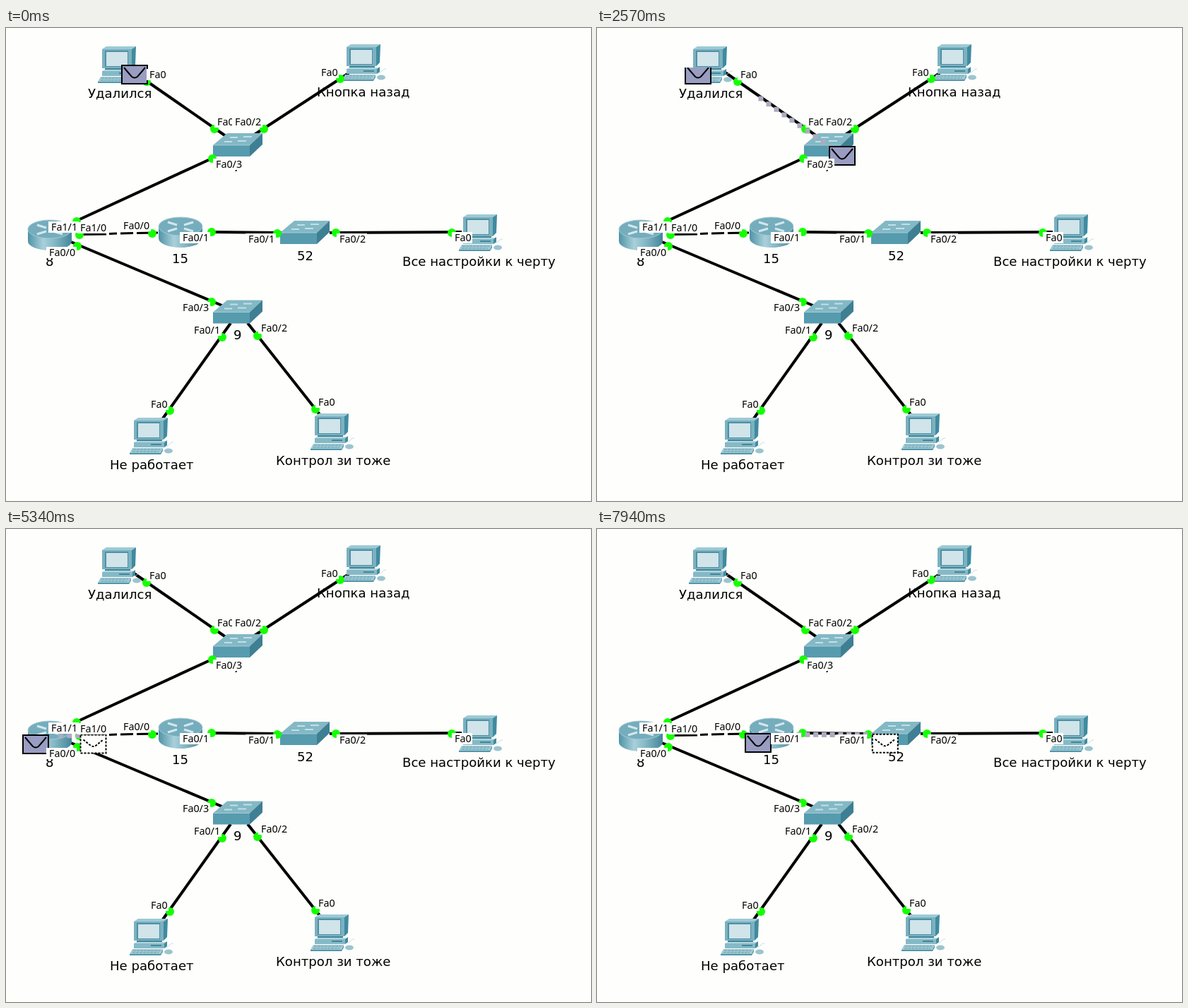
These frames come from a looping animation (828 px wide and 670 px high, 8 s). An HTML page:

```html
<!DOCTYPE html>
<html lang="ru">
<head>
<meta charset="utf-8">
<title>Network packet</title>
<style>
  html, body { margin: 0; width: 100%; height: 100%; overflow: hidden; background: #fefefc; }
  svg { display: block; }
  .link { stroke: #000; stroke-width: 4; }
  .cross { stroke: #000; stroke-width: 3; }
  .port { font: 14.3px "Noto Sans", "Open Sans", sans-serif; }
  .name { font: 18.1px "DejaVu Sans", sans-serif; }
</style>
</head>
<body>
<svg id="stage" width="828" height="670" viewBox="0 0 828 670">
  <defs>
    <linearGradient id="drum">
      <stop offset="0" stop-color="#4f93a6"/>
      <stop offset=".35" stop-color="#a9d0da"/>
      <stop offset=".6" stop-color="#85b8c6"/>
      <stop offset="1" stop-color="#43869a"/>
    </linearGradient>
    <g id="pc">
      <path d="M50 39q3 3 6-1t6-3" fill="none" stroke="#c9dde3"/>
      <path d="M10 30h36v6h-36z" fill="#43869a"/>
      <path d="M6 35l4-2h42l-3 2z" fill="#b3d6de"/>
      <path d="M6 35h43v7h-43z" fill="#86b9c6"/>
      <path d="M49 35l4-3v7l-4 3z" fill="#3f8ba0"/>
      <path d="M30 38h15" stroke="#43869a" stroke-width="2"/>
      <path d="M6 4l6-4h42l-6 4z" fill="#9dcad5"/>
      <path d="M48 4l6-4-1 26-5 5z" fill="#3f8ba0"/>
      <path d="M6 4h42v27h-42z" fill="#7bb1c0"/>
      <path d="M10 6h33v23h-33z" fill="#4f90a3"/>
      <path d="M12 8h30v20h-30z" fill="#d0e4ea"/>
      <path d="M4 43h43l-3 7h-44z" fill="#a0c9d3"/>
      <path d="M5 45h38M4 48h37" stroke="#659fb0" stroke-dasharray="4 1"/>
      <path d="M0 50h44l3-7v4l-3 5h-44z" fill="#5296a9"/>
      <ellipse cx="55" cy="47" rx="6" ry="3.5" fill="#9cc4cf"/>
    </g>
    <g id="switch">
      <path d="M0 17L20 0H70L52 17z" fill="#83b8c5"/>
      <path d="M0 17h52v16h-52z" fill="#569bae"/>
      <path d="M52 17L70 0V16L52 33z" fill="#3f7f93"/>
      <path d="M24 6h11M43 5h12M16 12h11M35 11h12" stroke="#c4dfe6" stroke-width="2"/>
      <path d="M0 17h52" stroke="#a3cbd6"/>
    </g>
    <g id="router">
      <path d="M0 14V31a31 13 0 0 0 62 0V14z" fill="url(#drum)"/>
      <ellipse cx="31" cy="14" rx="31" ry="13" fill="#75adbd" stroke="#a3cbd6"/>
      <path d="M13 8l13 4M49 8l-13 4M13 21l13-4M49 21l-13-4" stroke="#d3e7ec" stroke-width="3"/>
    </g>
    <g id="letter">
      <path d="M1 1h36v26h-36z" fill="#9a9dc2" stroke="#000" stroke-width="2"/>
      <path d="M4 4l5 6 6 7q4 3 8 0l6-7 5-6" fill="none" stroke="#000" stroke-width="2"/>
    </g>
    <g id="ghost">
      <path d="M1 1h36v26h-36z" fill="#fefefc" stroke="#000" stroke-width="2" stroke-dasharray="3 2"/>
      <path d="M5 8l10 8q4 3 8 0l10-8" fill="none" stroke="#000" stroke-width="2" stroke-dasharray="3 2"/>
    </g>
  </defs>
</svg>
<script>
const stage = document.getElementById('stage');

function add(tag, attrs, text) {
  const el = document.createElementNS('http://www.w3.org/2000/svg', tag);
  for (const key in attrs) el.setAttribute(key, attrs[key]);
  if (text) el.textContent = text;
  return stage.appendChild(el);
}
const icon = (id, x = 0, y = 0) => add('use', { href: '#' + id, x, y });
const place = (el, x, y) => el.setAttribute('transform', `translate(${x.toFixed(1)} ${y.toFixed(1)})`);
const show = (el, on) => el.setAttribute('visibility', on ? 'visible' : 'hidden');

const links = [
  'M180 62L311 153', 'M485 64L350 152', 'M293 184L100 273',
  'M291 289L390 290', 'M458 290L645 289', 'M92 303L308 394',
  'M318 418L222 553', 'M342 418L446 550'
];
links.forEach(d => add('path', { d, class: 'link' }));
add('path', { d: 'M104 292.5L142 292M146 291.5L157 291M162 291L180 290.6M185 290.6L215 290', class: 'cross' });

[[130, 26], [476, 23], [641, 264], [175, 552], [431, 546]].forEach(p => icon('pc', ...p));
[[293, 149], [388, 273], [293, 385.5]].forEach(p => icon('switch', ...p));
[[31, 271], [216, 267]].forEach(p => icon('router', ...p));

const lamps = [
  [199, 76], [473, 72], [295, 143], [365, 143], [292, 185], [100, 274],
  [104, 293], [101, 309], [207, 291], [291, 289], [384, 291], [467, 290],
  [631, 290], [291, 388], [306, 438], [356, 436], [232, 542], [438, 540]
];
lamps.forEach(([cx, cy]) => add('circle', { cx, cy, r: 6, fill: '#14ff00' }));

const names = [
  ['Удалился', 116, 99], ['Кнопка назад', 440, 97], ['Все настройки к черту', 561, 337],
  ['Не работает', 147, 625], ['Контрол зи тоже', 382, 618.5],
  ['7', 321, 203], ['8', 56, 337], ['15', 235, 333], ['52', 412, 329], ['9', 322, 441]
];
names.forEach(([text, x, y]) => add('text', { x, y, class: 'name' }, text));

// Moving parts lie above the devices and below the port labels.
const DOTS = 15, TAIL = 10;
const trail = Array.from({ length: DOTS }, () =>
  add('rect', { x: -.5, y: -1.5, width: 7, height: 7, fill: '#acacc0' }));
const sender = icon('letter'), arrived = icon('letter'), flying = icon('ghost');

const ports = [
  ['Fa0', 203, 66], ['Fa0', 446, 63], ['Fa0/1', 299, 133], ['Fa0/2', 324, 133],
  ['Fa0/3', 297, 193], ['Fa1/1', 64, 282], ['Fa1/0', 105, 283], ['Fa0/0', 166, 280],
  ['Fa0/1', 250, 297], ['Fa0/1', 343, 299], ['Fa0/2', 472, 299], ['Fa0', 635, 297],
  ['Fa0/0', 61, 318], ['Fa0/3', 250, 396], ['Fa0/1', 266, 428], ['Fa0/2', 361, 425],
  ['Fa0', 205, 533], ['Fa0', 442, 530]
];
ports.forEach(([text, x, y]) => {
  add('rect', { x: x - 4, y: y - 8, width: text.length > 3 ? 43 : 29, height: 16, fill: '#fefefc' });
  add('text', { x, y: y + 5, class: 'port' }, text);
});

const LOOP = 8000, FLIGHT = 1090;
const stops = [[163, 52], [328, 167], [62, 291], [248, 289], [424, 290]];
const starts = [788, 2896, 5091, 7068];

function draw(time) {
  const hop = starts.filter(s => s <= time).length - 1;
  const p = hop < 0 ? 0 : Math.min(1, (time - starts[hop]) / FLIGHT);
  const [x0, y0] = stops[Math.max(hop, 0)];
  const [x1, y1] = stops[hop + 1];
  const at = q => [x0 + (x1 - x0) * q, y0 + (y1 - y0) * q];
  const step = Math.floor(p * DOTS + .1);
  const landed = hop < 0 || p === 1;

  trail.forEach((dot, i) => {
    const k = i + 1;
    show(dot, hop >= 0 && k <= step && k > step - TAIL);
    place(dot, ...at(k / DOTS));
  });
  show(sender, hop >= 0);
  place(sender, x0 - 39, y0);
  sender.style.clipPath = step >= 13 ? 'inset(4px 0 0 0)' : 'none';
  show(flying, !landed);
  show(arrived, landed);
  place(landed ? arrived : flying, ...(hop < 0 ? stops[0] : at(p)));
}

let origin;
function tick(now) {
  origin ??= now;
  draw((now - origin) % LOOP);
  requestAnimationFrame(tick);
}
draw(0);
requestAnimationFrame(tick);
</script>
</body>
</html>
```
